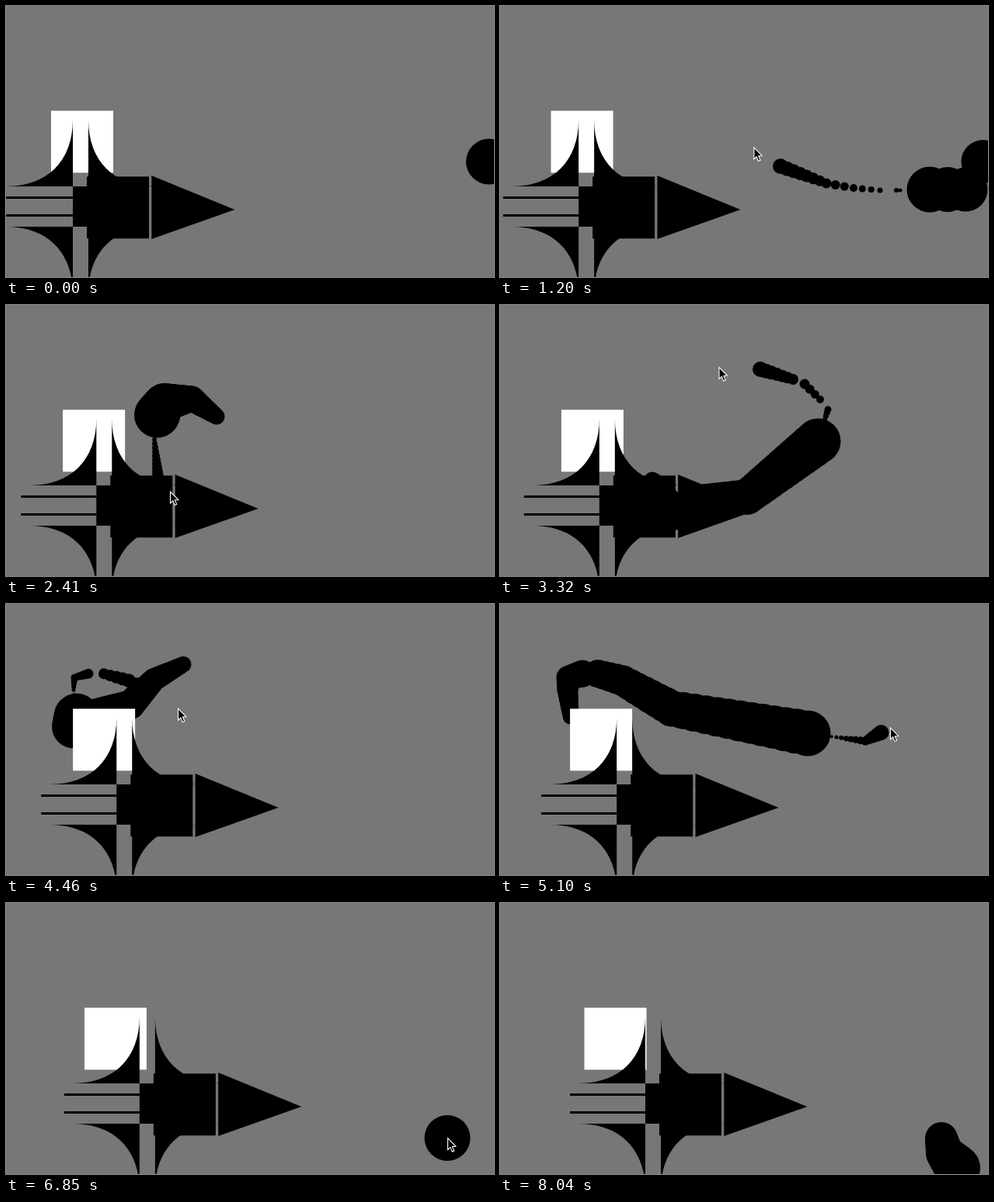
Write an HTML page with a canvas that moves like this. It is 628 px wide and 350 px high and loops after 8140 ms.

```html
<!DOCTYPE html>
<html lang="en">
<head>
<meta charset="utf-8">
<title>Rocket and pointer trail</title>
<style>
  html, body { margin: 0; width: 100%; height: 100%; overflow: hidden; background: #777; }
  canvas { display: block; }
</style>
</head>
<body>
<canvas id="stage" width="628" height="350"></canvas>
<script>
const ctx = document.getElementById('stage').getContext('2d');

const LOOP = 8140;       // ms
const STEP = 57.43;      // ms per drawn step
const LAST = 140;        // last step of the loop
const SAMPLES = 3.446;   // pointer samples per step
const TRAIL = 60;        // samples kept in the trail
const NEWEST = 20;       // diameter of the newest dot
const LEAD = 5;          // samples the pointer runs ahead of its trail
const ENTER = 49;        // sample at which the pointer comes in

// Pointer path: sample, x, y
const path = [
  [48, 621.5, 201], [49, 599, 237], [51, 553, 237], [52, 515, 238],
  [57, 515, 238], [58, 510, 238], [59, 489, 238], [62, 455, 235],
  [65, 420, 229], [72, 361, 207], [85, 271, 144], [97, 239, 121],
  [114, 203, 126], [123, 194.5, 142], [130, 191, 174], [140, 196, 226],
  [149, 211, 241], [152, 229, 274], [155, 265, 249], [165, 318, 248],
  [178, 409, 176], [188, 422, 135], [189, 412, 122], [192, 392, 102],
  [193, 377, 96], [199, 335, 83], [209, 228, 78], [218, 190, 98],
  [226, 160, 130], [245, 87.5, 158], [247, 91, 145], [253, 87, 111],
  [257, 88, 95], [261, 106, 90], [262, 126, 90], [266, 158, 99],
  [273, 221, 135], [285, 396, 167], [297, 470, 177], [315, 511, 155],
  [320, 522, 181], [323, 560, 240], [329, 574, 273], [336, 577, 285],
  [344, 568, 303], [444, 568, 304], [450, 572, 323], [461, 588.5, 342],
  [463, 594, 365]
];

function pointerAt(k) {
  const next = path.findIndex(p => p[0] >= k);
  if (next === 0) return path[0].slice(1);
  if (next < 0) return path[path.length - 1].slice(1);
  const [k0, x0, y0] = path[next - 1];
  const [k1, x1, y1] = path[next];
  const f = (k - k0) / (k1 - k0);
  return [x0 + (x1 - x0) * f, y0 + (y1 - y0) * f];
}

// The diameter wraps round, so the trail shrinks to nothing and starts big again.
function drawTrail(k) {
  ctx.fillStyle = '#000';
  for (let age = 0; age < TRAIL; age++) {
    const size = (NEWEST - age + TRAIL) % TRAIL;
    const [x, y] = pointerAt(k - age);
    ctx.beginPath();
    ctx.arc(x, y, size / 2, 0, Math.PI * 2);
    ctx.fill();
  }
}

function drawFin(x, y, sx, sy) {
  ctx.save();
  ctx.translate(x, y);
  ctx.scale(sx, sy);
  ctx.beginPath();
  ctx.moveTo(0, 0);
  ctx.lineTo(0, 86);
  ctx.bezierCurveTo(0, 33, 33, 0, 86, 0);
  ctx.fill();
  ctx.restore();
}

function drawRocket(dx) {
  ctx.save();
  ctx.translate(dx, 0);
  ctx.fillStyle = '#000';
  for (const [y, sy] of [[233, -1], [285, 1]]) {
    drawFin(86, y, -1, sy);
    drawFin(106, y, 1, sy);
  }
  ctx.fillRect(-11, 246, 97, 3);
  ctx.fillRect(-11, 269, 97, 3);
  ctx.fillRect(86, 233, 20, 52);
  ctx.fillRect(104, 220.3, 80, 80);
  ctx.beginPath();
  ctx.moveTo(187.3, 219);
  ctx.lineTo(294.3, 263);
  ctx.lineTo(187.3, 301);
  ctx.fill();
  ctx.restore();
}

function drawPointer(x, y) {
  ctx.save();
  ctx.translate(x, y);
  ctx.beginPath();
  ctx.moveTo(0.5, 0);
  for (const [px, py] of [[0.5, 15], [3.8, 11.9], [6.2, 17.5], [8.7, 16.4], [6.3, 10.9], [10.8, 10.6]]) {
    ctx.lineTo(px, py);
  }
  ctx.closePath();
  ctx.fillStyle = '#000';
  ctx.strokeStyle = '#fff';
  ctx.lineWidth = 1.1;
  ctx.fill();
  ctx.stroke();
  ctx.restore();
}

function draw(time) {
  const step = Math.min(LAST, Math.floor(time / STEP + 0.35));
  const k = Math.floor(step * SAMPLES);
  const dx = step * 101 / LAST;

  ctx.fillStyle = '#777';
  ctx.fillRect(0, 0, 628, 350);
  drawTrail(k);
  ctx.fillStyle = '#fff';
  ctx.fillRect(58 + dx / 2, 135.3, 80, 80);
  drawRocket(dx);
  if (k + LEAD >= ENTER) drawPointer(...pointerAt(k + LEAD));
}

const start = performance.now();
function tick() {
  draw((performance.now() - start) % LOOP);
  requestAnimationFrame(tick);
}
tick();
</script>
</body>
</html>
```
